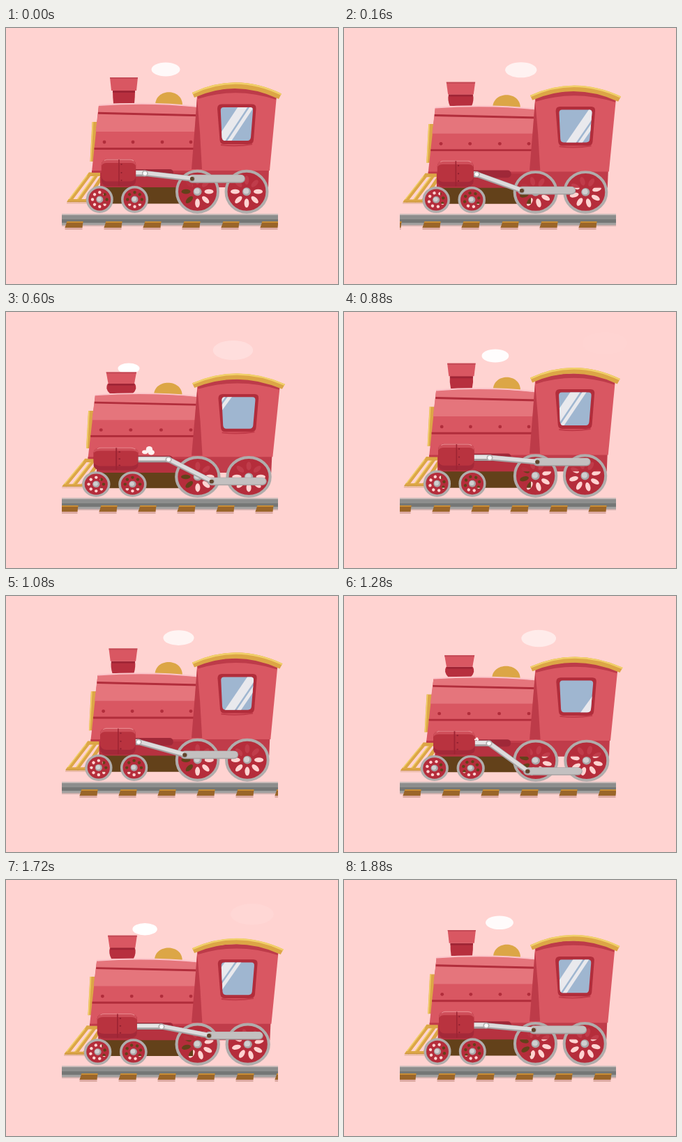
These frames come from a looping animation (476 by 368 pixels, 1.92 s). An HTML page with a canvas:

```html
<!DOCTYPE html>
<html lang="en">
<head>
<meta charset="utf-8">
<title>Steam train</title>
<style>
html, body { margin: 0; width: 476px; height: 368px; overflow: hidden; background: #ffd3d1; }
canvas { display: block; }
</style>
</head>
<body>
<canvas id="stage" width="476" height="368"></canvas>
<script>
const ctx = document.getElementById('stage').getContext('2d');
const TAU = Math.PI * 2, CYCLE = 960, STEP = 40;
const RED = '#d95762', LIGHT = '#e5757c', DARK = '#b12d3b', DEEP = '#c13b49';
const GOLD = '#dca646', SHINE = '#f1d06a', STEEL = '#b3b0b0', BROWN = '#63411a';

const wave = t => (1 - Math.cos(t / CYCLE * TAU)) / 2;

function fill(color, d) {
  ctx.fillStyle = color;
  ctx.fill(new Path2D(d));
}
function line(color, width, d, cap = 'butt') {
  ctx.strokeStyle = color;
  ctx.lineWidth = width;
  ctx.lineCap = cap;
  ctx.stroke(new Path2D(d));
}
function oval(color, x, y, rx, ry = rx) {
  ctx.fillStyle = color;
  ctx.beginPath();
  ctx.ellipse(x, y, rx, ry, 0, 0, TAU);
  ctx.fill();
}
function box(color, x, y, w, h, r = 0) {
  ctx.fillStyle = color;
  ctx.beginPath();
  ctx.roundRect(x, y, w, h, r);
  ctx.fill();
}
// Scale about a fixed point while drawing.
function scaled(x, y, sx, sy, draw) {
  ctx.save();
  ctx.translate(x, y);
  ctx.scale(sx, sy);
  ctx.translate(-x, -y);
  draw();
  ctx.restore();
}
function along(keys, v) {
  const i = Math.max(1, keys.findIndex(k => k[0] >= v));
  const [a, p] = keys[i - 1], [b, q] = keys[i];
  return p + (q - p) * (v - a) / (b - a);
}

function track(t) {
  ctx.save();
  ctx.beginPath();
  ctx.rect(80, 260, 310, 40);
  ctx.clip();
  box('#c9bbb9', 80, 267, 310, 2);
  box('#8d8e8d', 80, 269, 310, 6);
  box('#757776', 80, 275, 310, 5);
  box('#a09f9e', 80, 280, 310, 3);
  box('#cfb1ae', 80, 283, 310, 2);
  const shift = t / 320 * 56 % 56;
  for (let x = 28.5 + shift; x < 392; x += 56) {
    box('#dca9a1', x, 286, 25, 4);
    fill('#9a6529', `M${x + 3} 278h23l-1 9h-25z`);
    fill('#c88d35', `M${x + 3} 278h23v2h-24z`);
  }
  ctx.restore();
}

const RISE = [[0, 92], [40, 86], [80, 81], [360, 63], [440, 59.5], [760, 61], [1000, 57], [1040, 55], [1400, 42]];
function smoke(t) {
  const first = (t - 520 + CYCLE) % CYCLE;
  for (const age of [first, first + CYCLE]) {
    if (age > 1340) continue;
    const r = 14.4 + age * .0138;
    ctx.globalAlpha = Math.max(.03, Math.min(1, 1.3 - age / 1000));
    oval('#fff', 164.7 + age * .14 + age * age * 14e-6, along(RISE, age), r, r * .49);
  }
  ctx.globalAlpha = 1;
}

function chimney(s) {
  const neck = 90 + 4 * s, top = 71 + 6 * s, mid = (neck + 108) / 2;
  const bulge = 8 * s;
  fill('#b72f3e', `M${153 - 3 * s} ${neck}Q${153 - bulge} ${mid} ${154 - s} 108.5H${184 + s}` +
    `Q${185 + bulge} ${mid} ${185 + 3 * s} ${neck}z`);
  box('#9f2435', 153 - 2 * s, neck, 32 + 4 * s, 3);
  fill(RED, `M${149 - s} ${top}H${189 + s}L187 ${neck}H151z`);
  fill('#c44a56', `M${149 - s} ${top}H${189 + s}l-.4 2H${149.4 - s}z`);
}

function cowcatcher() {
  line('#e9b9a6', 2, 'M87 251.5H119');
  line(GOLD, 5, 'M121 209L91 249M130 211L103 249M138 213L115 249');
  line(SHINE, 1.5, 'M119 208.5L88.5 249M128 210.5L100.5 249');
  fill(GOLD, 'M119 207.5H140L138 213H116z');
  fill(GOLD, 'M90 246H120V250H87z');
  line('#c9933b', 1.2, 'M88 249.6H120');
}

function boiler() {
  fill(GOLD, 'M123.5 135H131L128 192H120.5z');
  line(SHINE, 1.5, 'M124.5 135L121.5 192');
  fill(GOLD, 'M214 111C214 86 253 86 253 111z');
  box(BROWN, 140, 228, 128, 24.5);
  fill('#b63240', 'M135 203H270V229H135z');
  fill(RED, 'M133 111.5Q205 106 277 114L281 207H123z');
  fill(LIGHT, 'M133 111.5Q205 106 277 114L276 149H128.5z');
  line('#fbc5ca', 2, 'M133 111Q205 105.5 276 113');
  line(DARK, 3, 'M132 122.3L277 125.8M126.5 173.5H274');
  line(DEEP, 3, 'M123 206.5H270');
  for (const x of [141, 182, 224, 265]) oval(DARK, x, 164, 2.4);
}

function glass(t) {
  fill(DARK, 'M309 109.5H353Q359 109.5 358.5 116L355 161Q354.5 167 348 167H313Q307 167 306.5 161L303 116Q303 109.5 309 109.5z');
  line(DEEP, 2, 'M308 168Q331 171 353 167');
  const pane = new Path2D('M312 114H350Q354.5 114 354 119L351 157Q350.5 162 346 162H314Q310 162 309.5 157L307.8 119Q307.5 114 312 114z');
  ctx.save();
  ctx.clip(pane);
  box('#9fb6d0', 300, 105, 60, 65);
  const age = (t - 560 + CYCLE) % CYCLE;
  const x = 296 + age * .08 + age * age * 3e-5;
  const band = (u, w) => fill('#e9e9ed', `M${u} 113h${w}l-33 50h${-w}z`);
  band(x, 14);
  band(x + 17, 6);
  ctx.restore();
}

function cab(t) {
  fill('#c03c4a', 'M267 204H377L376 229H267z');
  fill(RED, 'M274 97Q330 77 388 98L378 205H267z');
  fill('#bd3b49', 'M274 101L278 150L281 203H266z');
  fill('#bd3b49', 'M274 96Q330 77 388 96L387 103Q330 84 275 102z');
  fill(GOLD, 'M267 93Q330 63 395 94.5L391 102Q330 73 270 100z');
  line(SHINE, 2.5, 'M267.5 94Q330 64.2 394.5 95.5');
  glass(t);
}

function wheel(x, y, r, angle, big) {
  const p = new Path2D();
  p.arc(0, 0, r - 3, 0, TAU);
  for (let i = 0; i < 8; i++) {
    const a = i * TAU / 8, d = big ? 16.5 : 10.3;
    const cx = d * Math.cos(a), cy = d * Math.sin(a);
    const rx = big ? 6.5 : 2.2, ry = big ? 3.4 : 2.2;
    p.moveTo(cx + rx * Math.cos(a), cy + rx * Math.sin(a));
    p.ellipse(cx, cy, rx, ry, a, 0, TAU);
  }
  ctx.save();
  ctx.translate(x, y);
  ctx.rotate(angle);
  ctx.fillStyle = '#b52d3b';
  ctx.fill(p, 'evenodd');
  ctx.restore();
  ctx.strokeStyle = '#b0adac';
  ctx.lineWidth = big ? 4 : 3.5;
  ctx.beginPath();
  ctx.arc(x, y, r - 2, 0, TAU);
  ctx.stroke();
  oval('#a9a7a8', x, y, big ? 6 : 5);
  oval('#d0cfd0', x - .7, y - .7, big ? 4 : 3.2);
}

function cylinder(k) {
  scaled(161.5, 208, 1 + .27 * k, 1 - .13 * k, () => {
    box('#a42939', 137, 188.5, 49, 39, 8);
    box('#b9333f', 137, 188.5, 49, 32, 8);
    fill('#cf4f5a', 'M137 198V197Q137 188.5 145 188.5H178Q186 188.5 186 197V198Q184 194 179 194H144Q139 194 137 198z');
    line('#e8868c', 1.2, 'M141 190.5Q143 189 145 189H178Q181 189 183 191');
    line('#9d2433', 1.5, 'M162 189V227');
    for (const y of [196, 208, 219]) oval('#8f2030', 165.5, y, 1.1);
  });
}

function rods(turn) {
  const px = 275 + 20 * Math.cos(turn), py = 235 + 20 * Math.sin(turn);
  const jy = 209, jx = px - Math.sqrt(68 * 68 - (py - jy) ** 2);
  line('#a29c9d', 9, `M186 ${jy}H${jx}`);
  line('#e6e5e5', 5.5, `M186 ${jy - 1.2}H${jx}`);
  line('#a6a2a2', 12, `M${px} ${py}h70`, 'round');
  line('#c3c0c0', 10, `M${px} ${py - .6}h70`, 'round');
  line('#a5a2a3', 8, `M${jx} ${jy}L${px} ${py}`, 'round');
  line('#dddbdc', 5.5, `M${jx} ${jy - .8}L${px} ${py - .8}`, 'round');
  oval(STEEL, jx, jy, 4.5);
  oval('#fff', jx, jy, 2.8);
  oval('#62452d', px, py, 3);
}

function steam(t) {
  const age = (t - 300) / 300;
  if (age < 0 || age > 1.4) return;
  const x = 189 + 15 * Math.min(1, age), y = 206 - 7 * Math.min(1, age);
  const r = age < 1 ? 1.5 + 3.2 * age : 4.7 - 10 * (age - 1);
  oval('#fff0ef', x - r, y + r * .5, r * .9, r * .6);
  oval('#fff0ef', x + r * .9, y + r * .6, r, r * .8);
  oval('#fff0ef', x + r * .3, y - r * .3, r);
}

function draw(t) {
  const s = wave(t) ** .7, k = wave(t - 40);
  const roll = -t / CYCLE * TAU;
  ctx.clearRect(0, 0, 476, 368);
  track(t);
  smoke(t);
  scaled(265, 267, 1 + .043 * s, 1 - .06 * s, () => {
    cowcatcher();
    chimney(s);
    boiler();
    cab(t);
    box('#9f2838', 180, 203, 60, 11, 5);
    for (const x of [274.5, 345]) wheel(x, 235.2, 31.5, roll, true);
    for (const x of [134.3, 184.5]) wheel(x, 246.5, 19.7, roll, false);
    rods(roll - 114 / 360 * TAU);
    cylinder(k);
  });
  steam(t);
}

function frame() {
  draw(Math.floor(performance.now() / STEP) * STEP % CYCLE);
  requestAnimationFrame(frame);
}
frame();
</script>
</body>
</html>
```
